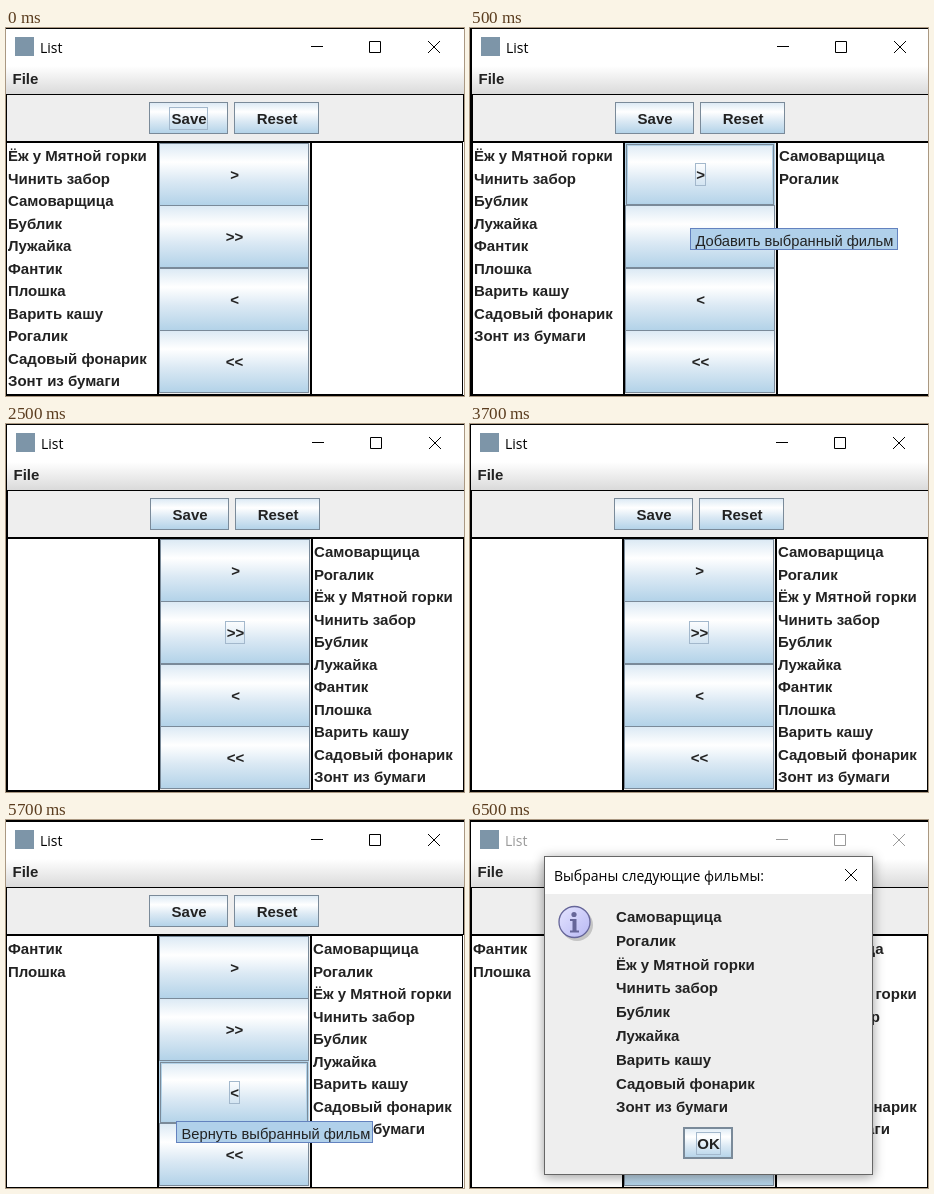
Write an HTML page that moves like this. It is 458 by 368 pixels and loops after 8000 ms.

```html
<!DOCTYPE html>
<html lang="ru">
<head>
<meta charset="utf-8">
<title>List</title>
<style>
html, body { margin: 0; width: 100%; height: 100%; overflow: hidden; background: #000; }
svg { display: block; }
text { font: bold 15px "Liberation Sans", Arial, sans-serif; fill: #222; white-space: pre; }
.tip { font-weight: normal; font-size: 14.7px; }
.caption { font: 14px "Open Sans", "Noto Sans", sans-serif; fill: #000; }
.idle { fill: #999; }
.mid { text-anchor: middle; }
.raised { filter: drop-shadow(0 2px 6px rgba(0, 0, 0, .4)); }
</style>
</head>
<body>
<svg width="458" height="368" viewBox="0 0 458 368">
  <defs>
    <linearGradient id="steel" x2="0" y2="1">
      <stop offset="0" stop-color="#dbe9f4"/>
      <stop offset=".3" stop-color="#fff"/>
      <stop offset=".6" stop-color="#dbe9f4"/>
      <stop offset="1" stop-color="#b2d2e8"/>
    </linearGradient>
    <linearGradient id="menu" x2="0" y2="1">
      <stop offset="0" stop-color="#fff"/>
      <stop offset="1" stop-color="#dadada"/>
    </linearGradient>
    <linearGradient id="ball" x2="1" y2="1">
      <stop offset="0" stop-color="#e4e4ff"/>
      <stop offset="1" stop-color="#b8b8f4"/>
    </linearGradient>
  </defs>
  <g id="stage"></g>
</svg>
<script>
const films = [
  'Ёж у Мятной горки', 'Чинить забор', 'Самоварщица', 'Бублик', 'Лужайка', 'Фантик',
  'Плошка', 'Варить кашу', 'Рогалик', 'Садовый фонарик', 'Зонт из бумаги'
];
const chosen = [2, 8, 0, 1, 3, 4, 7, 9, 10];

// x, y: window position; focus / hover: button labels; tip: [x, y, width, text]
const scenes = [
  { at: 0, x: 0, y: 0, left: [...films.keys()], right: [], focus: 'Save' },
  { at: 500, x: 2, y: 0, left: [0, 1, 3, 4, 5, 6, 7, 9, 10], right: [2, 8],
    focus: '&gt;', hover: '&gt;', tip: [220, 200, 208, 'Добавить выбранный фильм'] },
  { at: 2500, x: 1, y: 0, left: [], right: [2, 8, 0, 1, 3, 4, 5, 6, 7, 9, 10], focus: '&gt;&gt;' },
  { at: 4500, x: 0, y: 1, left: [5, 6], right: chosen,
    focus: '&lt;', hover: '&lt;', tip: [170, 301, 197, 'Вернуть выбранный фильм'] },
  { at: 6500, x: 1, y: 1, left: [5, 6], right: chosen, dialog: true }
];
const loop = 8000;
const focusWidth = { Save: 39, OK: 25, '&gt;': 11, '&lt;': 11, '&gt;&gt;': 20, '&lt;&lt;': 20 };
const edge = '#7a8a99', glow = '#b2d2e8';

const fill = (x, y, w, h, color) =>
  `<rect x="${x}" y="${y}" width="${w}" height="${h}" fill="${color}"/>`;
const box = (x, y, w, h, color, line = '#000') =>
  `<rect x="${x + .5}" y="${y + .5}" width="${w - 1}" height="${h - 1}" fill="${color}" stroke="${line}"/>`;
const text = (x, y, s, cls = '') => `<text x="${x}" y="${y}" class="${cls}">${s}</text>`;
const path = (d, color) => `<path d="${d}" fill="none" stroke="${color}"/>`;
const cross = (x, y, color) => path(`M${x} ${y}l12 12m0 -12l-12 12`, color);
const rows = (ids, x, y, step) => ids.map((id, i) => text(x, y + i * step, films[id])).join('');

function button(x, y, w, h, label, s) {
  const cx = x + w / 2, cy = y + h / 2, fw = focusWidth[label];
  let out = box(x, y, w, h, 'url(#steel)', edge);
  if (s.hover === label)
    [glow, edge, glow].forEach((line, i) => {
      out += box(x + i, y + i, w - 2 * i, h - 2 * i, 'none', line);
    });
  if (s.focus === label)
    out += box(Math.round(cx - fw / 2), Math.round(cy - 11.2), fw, 23, 'none', '#a3b8cc');
  return out + text(cx + .6, Math.round(cy + 5.5), label, 'mid');
}

function mainWindow(s) {
  const ink = s.dialog ? '#999' : '#000';
  return `<g transform="translate(${s.x} ${s.y})">` +
    fill(0, 1, 460, 366, '#fff') +
    fill(9, 9, 19, 19, '#7d95a8') +
    text(34, 25, 'List', s.dialog ? 'caption idle' : 'caption') +
    path('M305 18.5h12M363.5 13.5h11v11h-11z', ink) + cross(422, 13, ink) +
    fill(0, 38, 460, 28, 'url(#menu)') + text(6.5, 56, 'File') +
    box(0, 66, 458, 48, '#eee') +
    button(143, 74, 79, 32, 'Save', s) + button(228, 74, 85, 32, 'Reset', s) +
    box(0, 114, 152, 253, '#fff') + box(152, 114, 153, 253, '#eee') + box(305, 114, 152, 253, '#fff') +
    ['&gt;', '&gt;&gt;', '&lt;', '&lt;&lt;'].map((label, i) =>
      button(153, Math.floor(115 + 62.5 * i), 150, 63, label, s)).join('') +
    rows(s.left, 2, 133, 22.5) + rows(s.right, 307, 133, 22.5) +
    '</g>';
}

function tooltip([x, y, w, label]) {
  return box(x, y, w, 22, '#b0d0ea', '#6382bf') + text(x + 5.5, y + 18, label, 'tip');
}

function dialog(s) {
  return '<g class="raised">' + box(74, 36, 329, 319, '#eee', '#666') + '</g>' +
    fill(75, 37, 327, 37, '#fff') +
    text(84, 61, 'Выбраны следующие фильмы:', 'caption') + cross(375, 49, '#000') +
    '<circle cx="107" cy="105" r="16" fill="#c4c4c4"/>' +
    '<circle cx="104.5" cy="102" r="15.5" fill="url(#ball)" stroke="#666699" stroke-width="1.3"/>' +
    '<circle cx="104" cy="94.500" r="2.6" fill="#666699"/>' +
    '<path d="M100 99h6.500v11.500h2.500v2h-9v-2h2.500v-9.500h-2.500z" fill="#666699"/>' +
    rows(s.right, 146, 102, 23.8) +
    button(213, 307, 50, 32, 'OK', { focus: 'OK' }) +
    box(214, 308, 48, 30, 'none', edge);
}

const stage = document.getElementById('stage');
const start = performance.now();
let shown;

function draw(now) {
  const t = Math.max(0, now - start) % loop;
  const s = scenes.findLast(scene => scene.at <= t);
  if (s !== shown) {
    shown = s;
    stage.innerHTML = mainWindow(s) + (s.tip ? tooltip(s.tip) : '') + (s.dialog ? dialog(s) : '');
  }
  requestAnimationFrame(draw);
}
draw(start);
</script>
</body>
</html>
```
